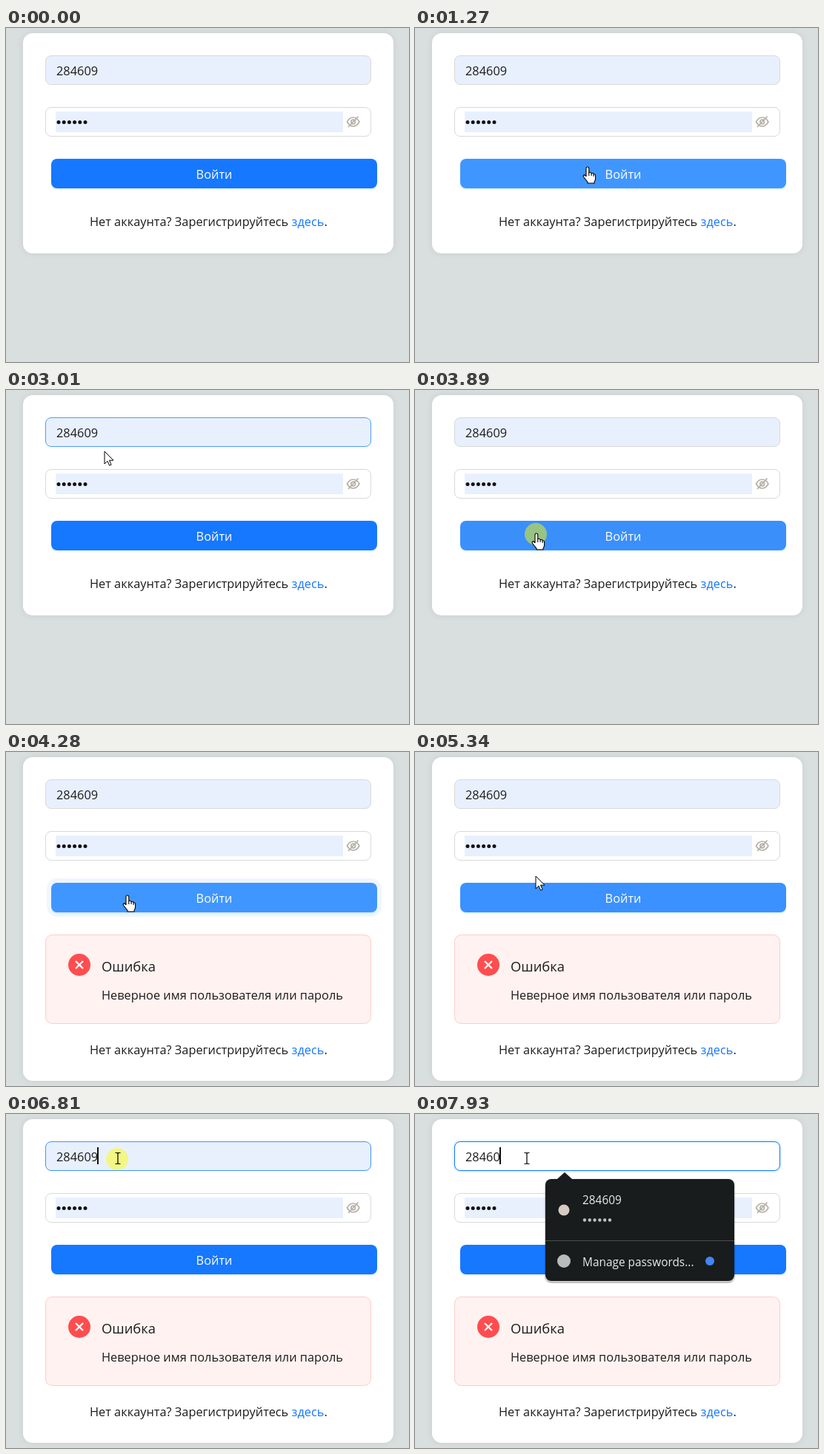
Animation, 544 px wide and 452 px high, one loop 8 s. Source, as an HTML page:

```html
<!DOCTYPE html>
<html lang="ru">
<head>
<meta charset="utf-8">
<title>Вход</title>
<style>
  html, body { margin: 0; width: 100%; height: 100%; overflow: hidden; background: #d9dfde; }
  svg { display: block; font: 16.35px "Open Sans", "Noto Sans", sans-serif; fill: #1c1c1c; }
  #card { fill: #fff; filter: drop-shadow(0 0 5px rgba(0, 0, 0, .07)); }
  #popup { filter: drop-shadow(0 1px 0 #e4e4e4) drop-shadow(0 1px 1px rgba(0, 0, 0, .5)); }
  .dots { fill: none; stroke-linecap: round; }
  .line { fill: none; }
</style>
</head>
<body>
<svg width="544" height="452" viewBox="0 0 544 452">
  <rect id="card" x="23" y="7" width="500" height="298" rx="13"/>

  <rect id="glow" x="51" y="35" width="444" height="44" rx="10" fill="#0591ff" fill-opacity=".12"/>
  <rect id="login" x="53.5" y="37.5" width="439" height="39" rx="7.5"/>
  <text id="value" x="68" y="64"></text>
  <path id="caret" d="M0 45v23" stroke="#111" stroke-width="2"/>

  <rect id="password" x="53.5" y="107.5" width="439" height="39" rx="7.5" fill="#fff"/>
  <path d="M67 113h388v28H67z" fill="#e8f0fe"/>
  <path class="dots" d="M71 127.5h36.5" stroke="#111" stroke-width="5" stroke-dasharray="0 7.2"/>
  <g class="line" stroke="#b5b0a6" stroke-width="1.7">
    <path d="M460.5 127q3.2-6 8.2-6t8.2 6q-3.2 6-8.2 6t-8.2-6z"/>
    <circle cx="468.7" cy="127" r="2.8"/>
    <path d="M475.5 119.5l-13.5 14.5"/>
  </g>

  <rect id="wave" fill="#1677ff"/>
  <rect x="61" y="179" width="440" height="40" rx="8" fill="#0591ff" fill-opacity=".1"/>
  <rect id="button" x="61" y="177" width="440" height="40" rx="8"/>
  <text x="281" y="204" text-anchor="middle" fill="#fff">Войти</text>

  <g id="error">
    <rect x="53.5" y="247.5" width="439" height="120" rx="9" fill="#fff2f0" stroke="#ffccc7"/>
    <circle cx="99" cy="288" r="15" fill="#ff4d4f"/>
    <path d="M94 283l10 10m0-10l-10 10" stroke="#fff" stroke-width="2.3"/>
    <text x="129" y="297" font-size="18.4">Ошибка</text>
    <text x="129" y="335">Неверное имя пользователя или пароль</text>
  </g>
  <text id="signup" x="113" y="268">Нет аккаунта? Зарегистрируйтесь <tspan fill="#1677ff">здесь</tspan>.</text>

  <g id="popup" fill="#e8eaea" font-size="15.4">
    <rect x="176" y="88" width="255" height="138" rx="8" fill="#181c1d"/>
    <path d="M192 88l10-9 10 9z" fill="#181c1d"/>
    <path d="M176 171.5h255" stroke="#4b4f50"/>
    <circle cx="201" cy="130" r="7.5" fill="#d6cbc2"/>
    <text id="saved" x="226" y="122"></text>
    <path class="dots" d="M229 143.5h34.5" stroke="#bfc2c3" stroke-width="4.4" stroke-dasharray="0 6.8"/>
    <circle cx="201" cy="199" r="9" fill="#b9bcbd"/>
    <text x="226" y="206">Manage passwords...</text>
    <circle cx="398" cy="199" r="6" fill="#4285f4"/>
  </g>

  <g id="cursor">
    <circle id="press" cx="-1" cy="1" r="15" fill="#ff0" fill-opacity=".48"/>
    <path id="arrow" d="M0 0v17l4-3.8 2.6 6 2.5-1.1-2.6-5.9h5.5z" fill="#fff" stroke="#000"/>
    <g id="hand" fill="#fff" stroke="#000" stroke-width="1.1">
      <path d="M-2 13V1.9a1.9 1.9 0 0 1 3.8 0V7.5q3-.8 3.3 1.2 2.8-.8 3 1.1 2.5-.3 2.5 2V16q0 2-1.5 4v2H0v-1.5l-5.5-7q-1-2.3 1-2.6 1.5 0 2.5 2.1z"/>
      <path class="line" d="M1.8 7.5V12M5.1 8.7V12M8.1 9.8V13"/>
    </g>
    <path id="beam" class="line" stroke="#000" stroke-width="1.2" d="M-3.5-7.5H-1L0-6.5 1-7.5h2.5M0-6.5v13M-3.5 7.5H-1L0 6.5 1 7.5h2.5"/>
  </g>
</svg>
<script>
const LOOP = 8000, USER = '284609';
const CLICK = 3820, FAIL = 4090, FOCUS = 6810, OPEN = 6950, EDIT = 7800;
const GREY = [217, 217, 217], HOVER = [64, 150, 255], BLUE = [22, 119, 255], DARK = [9, 88, 217];
const AUTOFILL = [232, 240, 254], WHITE = [255, 255, 255];
const LOGIN_Y = 37, PASSWORD_Y = 107, BUTTON_Y = 177;

const el = {};
document.querySelectorAll('[id]').forEach(e => el[e.id] = e);
el.saved.textContent = USER;

// Pointer moves: when each starts and ends, and where it goes
const START = [372, 460];
const moves = [
  { from: 270, to: 810, at: [239, 184] },
  { from: 1140, to: 1270, at: [233, 188] },
  { from: 1800, to: 1870, at: [204, 181] },
  { from: 2070, to: 2270, at: [126, 91] },
  { from: 2390, to: 2540, at: [122, 44] },
  { from: 2870, to: 3290, at: [164, 194] },
  { from: 5210, to: 5700, at: [159, 46] },
  { from: 6410, to: 6610, at: [151, 60] }
];

const clamp = v => Math.min(1, Math.max(0, v));
const ramp = (t, a, b) => clamp((t - a) / (b - a));
const smooth = k => k * k * (3 - 2 * k);
const within = (t, a, b) => t >= a && t < b;
const mix = (p, q, k) => p.map((v, i) => v + (q[i] - v) * k);
const rgb = c => `rgb(${c.map(Math.round)})`;
const show = (e, on) => e.style.display = on ? '' : 'none';
const set = (e, attrs) => { for (const k in attrs) e.setAttribute(k, attrs[k]); };

const pointer = t => moves.reduce((p, m) => mix(p, m.at, smooth(ramp(t, m.from, m.to))), START);
const over = (t, top) => within(pointer(t)[1], top, top + 40);

// A 200 ms transition: the share of that time the pointer spent on the control
function hover(t, top) {
  let hits = 0;
  for (let age = 0; age < 200; age += 10) hits += over(t - age, top);
  return hits / 20;
}

function drawFields(t) {
  const edited = t >= EDIT, focus = ramp(t, FOCUS, FOCUS + 200);
  set(el.login, {
    fill: rgb(mix(AUTOFILL, WHITE, ramp(t, EDIT, EDIT + 130))),
    stroke: rgb(mix(mix(GREY, HOVER, hover(t, LOGIN_Y)), BLUE, focus))
  });
  set(el.glow, { opacity: focus });
  set(el.password, { stroke: rgb(mix(GREY, HOVER, hover(t, PASSWORD_Y))) });
  el.value.textContent = edited ? USER.slice(0, -1) : USER;
  set(el.caret, { transform: `translate(${Math.round(68 + el.value.getComputedTextLength())})` });
  show(el.caret, within(t, FOCUS, 7270) || edited);
  show(el.popup, t >= OPEN);
}

function drawButton(t) {
  const pressed = ramp(t, CLICK + 50, CLICK + 250) - ramp(t, CLICK + 160, CLICK + 360);
  set(el.button, { fill: rgb(mix(mix(BLUE, HOVER, hover(t, BUTTON_Y)), DARK, pressed)) });
  const age = t - CLICK - 160, spread = 6 * (1 - (1 - clamp(age / 400)) ** 3);
  set(el.wave, {
    x: 61 - spread, y: BUTTON_Y - spread, width: 440 + 2 * spread, height: 40 + 2 * spread,
    rx: 8 + spread, opacity: age < 0 ? 0 : .17 * (1 - clamp(age / 500))
  });
}

function drawCursor(t) {
  const onButton = over(t, BUTTON_Y), onField = over(t, LOGIN_Y) || over(t, PASSWORD_Y);
  set(el.cursor, { transform: `translate(${pointer(t).map(Math.round)})` });
  show(el.hand, onButton);
  show(el.beam, onField);
  show(el.arrow, !onButton && !onField);
  show(el.press, [CLICK, FOCUS].some(c => within(t, c, c + 190)));
}

function draw() {
  const t = performance.now() % LOOP, failed = t >= FAIL;
  set(el.card, { height: failed ? 438 : 298 });
  set(el.signup, { y: failed ? 409 : 268 });
  show(el.error, failed);
  drawFields(t);
  drawButton(t);
  drawCursor(t);
  requestAnimationFrame(draw);
}
draw();
</script>
</body>
</html>
```
